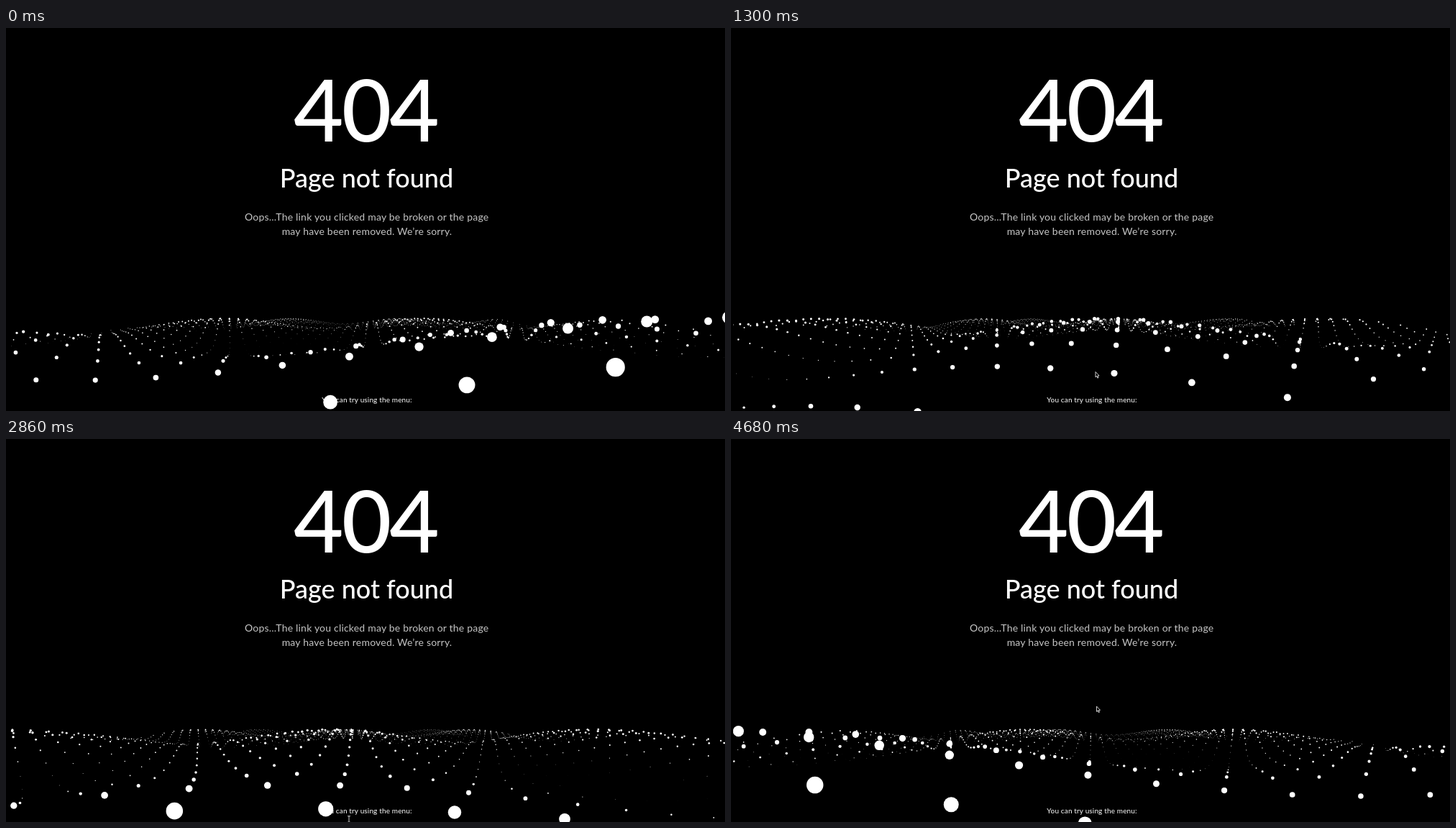
These frames come from a looping animation (1000x533 px, 4810 ms). An HTML page with a canvas:

```html
<!DOCTYPE html>
<html lang="en">
<head>
<meta charset="utf-8">
<title>Page not found</title>
<style>
  html, body { margin: 0; width: 100%; height: 100%; overflow: hidden; background: #000; }
  svg, canvas { position: absolute; left: 0; top: 0; width: 100%; height: 100%; display: block; }
  text { font-family: Lato, "Open Sans", sans-serif; fill: #fff; text-anchor: middle; }
  .code { font-size: 120px; font-weight: 500; letter-spacing: -3px; }
  .title { font-size: 36px; font-weight: 500; }
  .note { font-size: 14px; letter-spacing: .2px; fill: #c4c4c4; }
  .menu { font-size: 10px; letter-spacing: .15px; }
</style>
</head>
<body>
<svg viewBox="0 0 1000 533">
  <text class="code" x="500" y="158">404</text>
  <text class="title" x="501.5" y="221.5">Page not found</text>
  <text class="note" x="501.7" y="268">Oops...The link you clicked may be broken or the page</text>
  <text class="note" x="502" y="287.5">may have been removed. We’re sorry.</text>
  <text class="menu" x="502" y="521">You can try using the menu:</text>
</svg>
<canvas id="stage" width="1000" height="533"></canvas>
<script>
const ctx = document.getElementById('stage').getContext('2d');
const STEP = 130, STEPS = 37;
const GRID = 50, GAP = 100;
const FOCAL = 196, CX = 500, CY = 423.5;   // projection
const EYE_Y = 97, EYE_Z = 1000;            // the camera always looks at the origin
const TICK = 0.1, FOLLOW = 0.05, REACH = 1.65;

// Wave phase: [step, phase]
const PHASE = [[0, -4.57], [4, -2.45], [14, 1.18], [22, 3.4], [36, 7.7]];
// Pointer tip: [step, x, y]
const POINTER = [[0, 528, 545], [4, 649, 489], [8, 719, 486], [10, 507, 478.5], [14, 428.5, 484.5],
  [18, 358, 500], [22, 477, 529], [26, 531, 560], [31, 502, 540], [34, 508.5, 372]];

function at(keys, n, k) {
  const i = keys.findIndex(key => key[0] > n);
  if (i < 0) return keys[keys.length - 1][k];
  const a = keys[i - 1], b = keys[i];
  return a[k] + (b[k] - a[k]) * (n - a[0]) / (b[0] - a[0]);
}

// The camera drifts after the pointer, a fixed share of the way per tick
const eyes = [29.5];
for (let n = 1; n < STEPS; n++) {
  const ticks = (at(PHASE, n, 1) - at(PHASE, n - 1, 1)) / TICK;
  const goal = REACH * (at(POINTER, n - 0.5, 1) - CX);
  eyes[n] = goal + (eyes[n - 1] - goal) * (1 - FOLLOW) ** ticks;
}

function drawWaves(phase, eyeX) {
  const M = Math.hypot(eyeX, EYE_Z), L = Math.hypot(M, EYE_Y);
  ctx.fillStyle = '#fff';
  for (let ix = 0; ix < GRID; ix++) {
    const u = Math.sin((ix + phase) * 0.3);
    const dx = (ix - GRID / 2) * GAP - eyeX;
    for (let iy = 0; iy < GRID; iy++) {
      const v = Math.sin((iy + phase) * 0.5);
      const dz = EYE_Z - (iy - GRID / 2) * GAP;
      const drop = EYE_Y - 50 * (u + v);
      const ahead = (EYE_Z * dz - eyeX * dx) / M;
      const depth = (ahead * M + EYE_Y * drop) / L;
      if (depth < 1) continue;
      const zoom = FOCAL / depth;
      const x = CX + zoom * (EYE_Z * dx + eyeX * dz) / M;
      const y = CY + zoom * (drop * M - EYE_Y * ahead) / L;
      const r = zoom * (2 * (u + v) + 4);
      if (x < -r || x > 1000 + r || y > 533 + r) continue;
      ctx.beginPath();
      ctx.arc(x, y, r, 0, 2 * Math.PI);
      ctx.fill();
    }
  }
}

const ARROW = new Path2D('M0 0V7.4L1.7 5.9L2.8 8.6L4 8.1L2.9 5.5L5 5.3Z');
const BEAM = new Path2D('M-2 -4.2H2M0 -4.2V4.2M-2 4.2H2');

function drawPointer(n) {
  const x = at(POINTER, n, 1), y = at(POINTER, n, 2);
  const overMenu = y > 512;
  ctx.save();
  ctx.translate(x, y);
  ctx.fillStyle = '#000';
  ctx.strokeStyle = '#fff';
  ctx.lineWidth = 0.8;
  if (!overMenu) ctx.fill(ARROW);
  ctx.stroke(overMenu ? BEAM : ARROW);
  ctx.restore();
}

function render(time) {
  const n = Math.floor(time / STEP) % STEPS;
  ctx.clearRect(0, 0, 1000, 533);
  ctx.save();
  ctx.beginPath();
  ctx.rect(3, 0, 997, 533);
  ctx.clip();
  drawWaves(at(PHASE, n, 1), eyes[n]);
  ctx.restore();
  drawPointer(n);
}

const start = performance.now();
function frame() {
  render(performance.now() - start);
  requestAnimationFrame(frame);
}
frame();
</script>
</body>
</html>
```
